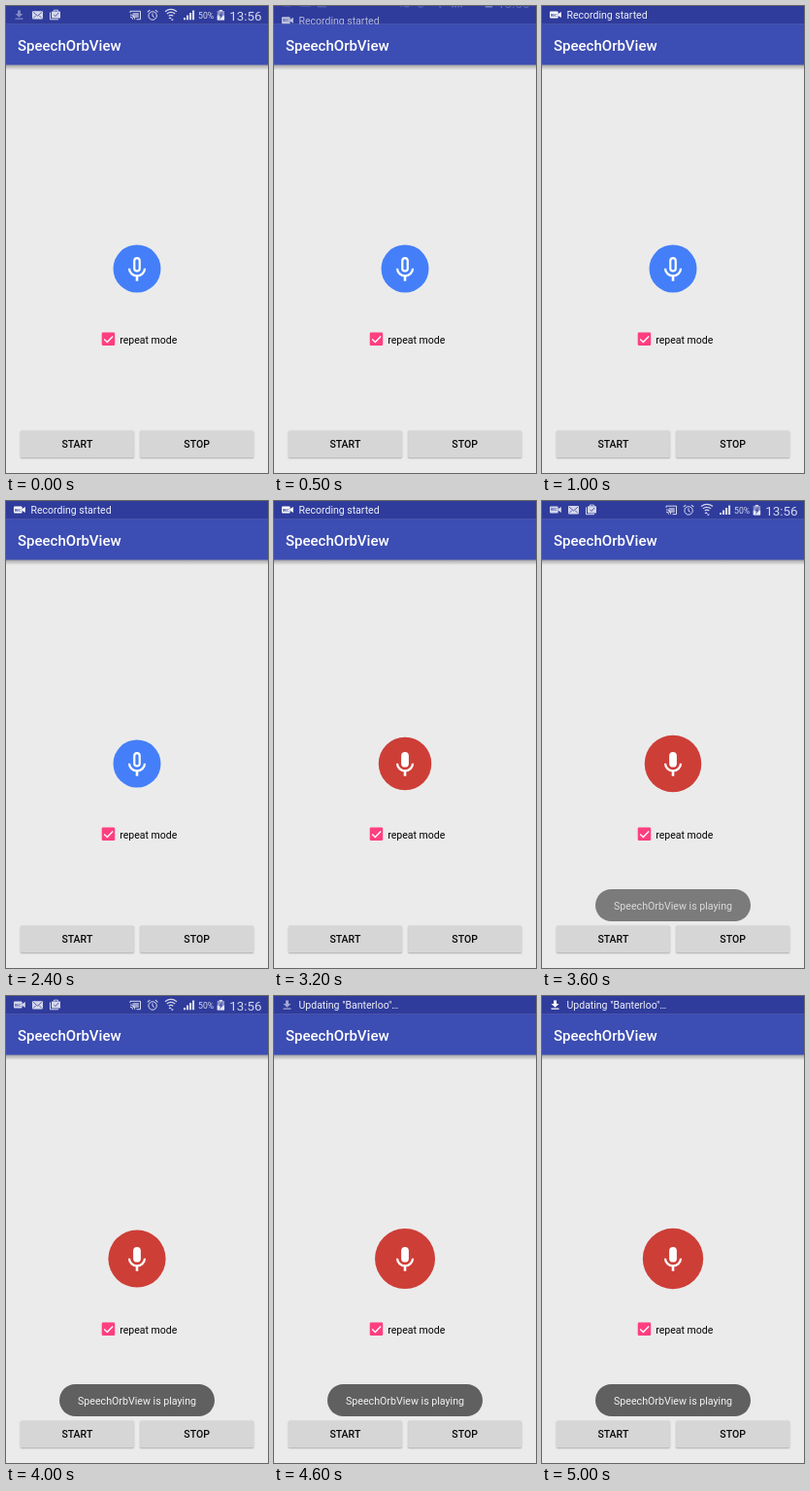
Write an HTML page with a canvas that moves like this. It is 270 by 480 pixels and loops after 5100 ms.

```html
<!DOCTYPE html>
<html lang="en">
<head>
<meta charset="utf-8">
<title>SpeechOrbView</title>
<style>
html, body { margin: 0; width: 100%; height: 100%; overflow: hidden; background: #ebebeb; }
canvas { display: block; width: 270px; height: 480px; }
</style>
</head>
<body>
<canvas id="stage" width="270" height="480"></canvas>
<script>
const ctx = document.getElementById('stage').getContext('2d');
const LOOP = 5100, STEP = 100, BAR = 18.75;
const STATUS = '#2f3c9c', PRIMARY = '#3c4db3';

const clamp = v => Math.max(0, Math.min(1, v));
const ease = v => (1 - Math.cos(Math.PI * clamp(v))) / 2;

function track(keys, t) {
  let [t0, v0] = keys[0];
  for (const [t1, v1] of keys.slice(1)) {
    if (t < t1) return v0 + (v1 - v0) * clamp((t - t0) / (t1 - t0));
    [t0, v0] = [t1, v1];
  }
  return v0;
}

function group(draw, x = 0, y = 0, alpha = 1, scale = 1) {
  ctx.save();
  ctx.translate(x, y);
  ctx.scale(scale, scale);
  ctx.globalAlpha *= alpha;
  draw();
  ctx.restore();
}

function text(str, x, y, size, color = '#fff', weight = 400, align = 'left') {
  ctx.font = `${weight} ${size}px Roboto, sans-serif`;
  ctx.textAlign = align;
  ctx.fillStyle = color;
  ctx.fillText(str, x, y);
}

function box(x, y, w, h, r, color) {
  ctx.beginPath();
  ctx.roundRect(x, y, w, h, r);
  ctx.fillStyle = color;
  ctx.fill();
}

function line(d, width = 1, color = '#fff') {
  ctx.lineWidth = width;
  ctx.strokeStyle = color;
  ctx.stroke(new Path2D(d));
}

function shape(d, color = '#fff') {
  ctx.fillStyle = color;
  ctx.fill(new Path2D(d));
}

function downloadIcon() {
  shape('M12 4.5h3v3.5h2.5l-4 3.8l-4-3.8h2.5z');
  box(9.5, 12.5, 8, 1.2, 0, '#fff');
}

function recordIcon() {
  box(8, 5.5, 8.6, 7, 1, '#fff');
  shape('M16.5 8.3l3.3-2.3v6l-3.3-2.3z');
  text('REC', 12.3, 10.6, 3.6, STATUS, 700, 'center');
}

function mailIcon() {
  box(27, 5.2, 11, 8.3, 1, '#fff');
  line('M28 6.3l4.5 3.8l4.5-3.8M28 12.6l3-3M37 12.6l-3-3', 0.9, STATUS);
}

function taskIcon() {
  line('M45.5 6.5v7.3h8.5', 1);
  line('M49.5 5.5v-1.3h4v1.3', 0.9);
  box(47, 5.4, 9, 7.2, 0.7, '#fff');
  line('M49.3 8.9l1.7 1.7l3.2-3.6', 1, STATUS);
}

function castIcon() {
  line('M128 7v-1.7h10.5v8.4h-4', 1);
  line('M128 9a4.7 4.7 0 0 1 4.7 4.7M128 11.2a2.5 2.5 0 0 1 2.5 2.5', 1);
  box(130.5, 7, 6.3, 5, 0, 'rgba(255,255,255,.65)');
}

function alarmIcon() {
  line('M155.3 10a4.2 4.2 0 1 1-8.4 0a4.2 4.2 0 1 1 8.4 0M151 7.5v2.8l1.8 1.2', 1);
  line('M145.8 6.3l2.5-2.1M156.4 6.3l-2.5-2.1', 1.1);
}

function wifiIcon() {
  line('M164 5.7q6-4.6 12 0M165.8 8q4.2-3.2 8.4 0M167.7 10.2q2.3-1.7 4.6 0', 1.2);
  shape('M167.5 13l1.6-1.8l1.6 1.8zM169.7 13.5h3.2l-1.6 1.8z');
}

function signalIcon() {
  for (let i = 0; i < 4; i++) {
    const h = 2.2 + i * 2.5;
    box(183 + i * 3, 14.2 - h, 2.1, h, 0, '#fff');
  }
}

function batteryIcon() {
  box(219.7, 4, 3.4, 1.5, 0, '#fff');
  box(217.7, 5, 7.4, 9.5, 0.6, 'rgba(255,255,255,.55)');
  box(217.7, 9.5, 7.4, 5, 0.6, '#fff');
  shape('M223 6l-4 4.5h2l-1 3.5l4-4.7h-2z', STATUS);
}

function statusIcons(first) {
  first();
  group(() => {
    for (const icon of [mailIcon, taskIcon, castIcon, alarmIcon, wifiIcon, signalIcon, batteryIcon]) icon();
    text('50%', 198, 13.4, 8.7);
    text('13:56', 263.5, 14.7, 13.4, '#fff', 400, 'right');
  }, 0, 0, 0.8);
}

// The ticker pushes the status icons out upwards, and gives way downwards.
function statusBar(t) {
  const updating = t > 3900;
  const shown = updating ? ease((t - 4180) / 400)
    : ease((t - 250) / 400) - ease((t - 3220) / 400);
  const bright = updating && t >= 4900;
  const download = () => group(downloadIcon, 0, 0, bright ? 1 : updating ? 0.55 : 0.4);

  ctx.save();
  ctx.beginPath();
  ctx.rect(0, 0, 270, BAR);
  ctx.clip();
  box(0, 0, 270, BAR, 0, STATUS);
  if (shown < 1) {
    const first = t < 2000 ? download : () => group(recordIcon, 0, 0, 0.8);
    group(() => statusIcons(first), 0, -BAR * shown, 1 - shown);
  }
  if (shown > 0) {
    group(() => {
      (updating ? download : recordIcon)();
      text(updating ? 'Updating "Banterloo"…' : 'Recording started', 25.5, 12.8, 10.5, '#f0f1f8');
    }, 0, BAR * (1 - shown), shown);
  }
  ctx.restore();
}

function appBar() {
  const shade = ctx.createLinearGradient(0, 60.5, 0, 66);
  shade.addColorStop(0, 'rgba(0,0,0,.3)');
  shade.addColorStop(1, 'rgba(0,0,0,0)');
  box(0, 60, 270, 6, 0, shade);
  box(0, BAR - 0.5, 270, 61 - BAR, 0, PRIMARY);
  text('SpeechOrbView', 12, 45.9, 15, '#fff', 500);
}

function microphone(filled) {
  if (filled) box(9, 2, 6, 12, 3, '#fff');
  else line('M9.9 5a2.1 2.1 0 0 1 4.2 0v6a2.1 2.1 0 0 1-4.2 0z', 1.7);
  line('M5.85 11a6.15 5.95 0 0 0 12.3 0', 1.7);
  line('M12 17v4', 2);
}

function orb(t) {
  const listening = t >= 3100;
  const radius = track([[3000, 24.5], [3100, 25.5], [3300, 29], [3500, 29.2],
    [4000, 29.6], [4300, 30.2], [4600, 31], [5000, 31.2]], t);
  ctx.beginPath();
  ctx.arc(135, 270, radius, 0, Math.PI * 2);
  ctx.fillStyle = listening ? '#cd3e37' : '#447ff9';
  ctx.fill();
  group(() => microphone(listening), 119.4, 255.4, 1, 1.3);
}

function checkbox() {
  box(98.7, 335.6, 13.5, 13.5, 1.3, '#ff3f7f');
  line('M101.2 342.4l3.1 3.1l5.8-6', 1.4);
  text('repeat mode', 117.3, 346.6, 10.5, '#000');
}

function button(label, x) {
  ctx.save();
  ctx.shadowColor = 'rgba(0,0,0,.3)';
  ctx.shadowBlur = 1.5;
  ctx.shadowOffsetY = 0.8;
  box(x, 436.5, 117, 27.7, 1.5, '#d6d6d6');
  ctx.restore();
  text(label, x + 58.5, 454.2, 10.5, '#080808', 500, 'center');
}

function toast(t) {
  const alpha = clamp((t - 3200) / 500);
  if (!alpha) return;
  group(() => {
    box(55, 399, 160, 33, 16.5, '#606060');
    text('SpeechOrbView is playing', 135, 419.6, 10.65, '#f2f2f2', 400, 'center');
  }, 0, 0, alpha);
}

function render(t) {
  box(0, 0, 270, 480, 0, '#ebebeb');
  appBar();
  statusBar(t);
  orb(t);
  checkbox();
  button('START', 14.9);
  button('STOP', 138.1);
  toast(t);
}

const start = performance.now();
function tick(now) {
  const t = Math.max(0, now - start) % LOOP;
  render(Math.floor(t / STEP) * STEP);
  requestAnimationFrame(tick);
}
render(0);
requestAnimationFrame(tick);
</script>
</body>
</html>
```
